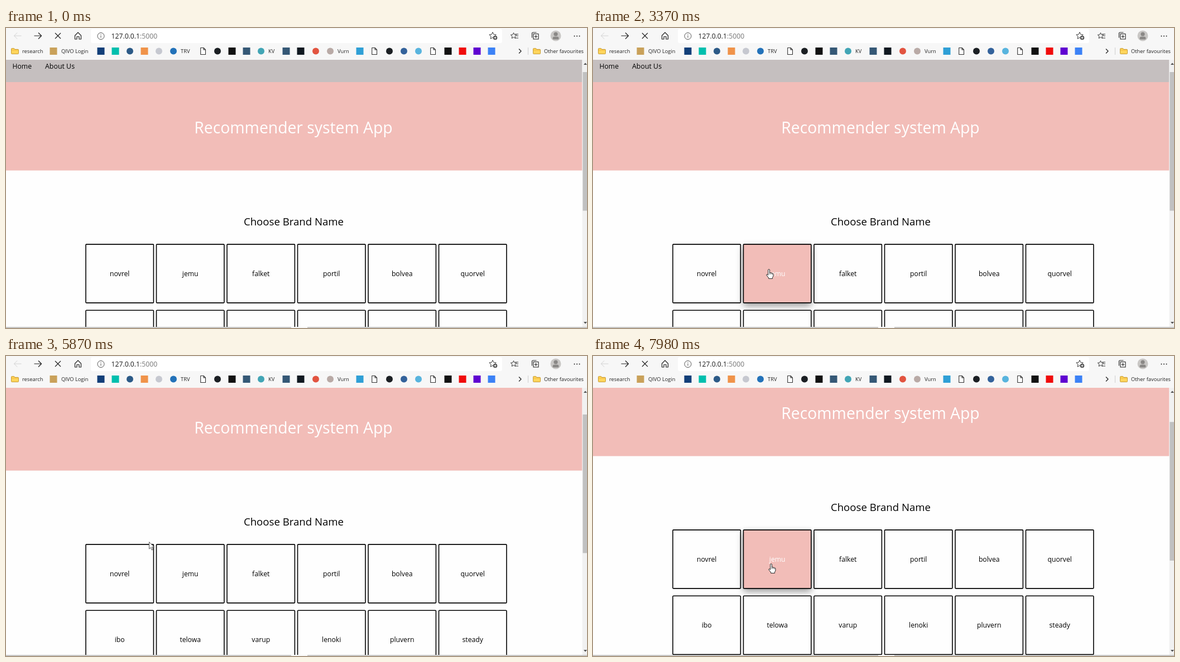
An HTML page with a canvas for the animation above (8 s loop, 1041x538 px).

```html
<!DOCTYPE html>
<html lang="en">
<head>
<meta charset="utf-8">
<title>Recommender system App</title>
<style>
  html, body { margin: 0; width: 100%; height: 100%; overflow: hidden; background: #fff; }
  canvas { display: block; }
</style>
</head>
<body>
<canvas id="stage" width="1041" height="538"></canvas>
<script>
const ctx = document.getElementById('stage').getContext('2d');
const LOOP = 8000;
const PINK = '#f2bdb8', INK = '#000', ICON = '#3b3b3b';
const FONT = '"Open Sans", "Noto Sans", sans-serif';

const VIEW = { top: 57, bottom: 536, right: 1032.6 };
const BOX = { x: 142.2, y: 387.1, w: 123, h: 106.6, dx: 126.5, dy: 118.4, line: 1.6 };
const BRANDS = [
  ['novrel', 'jemu', 'falket', 'portil', 'bolvea', 'quorvel'],
  ['ibo', 'telowa', 'varup', 'lenoki', 'pluvern', 'steady']
];

// Page offset: [time, pixels]
const SCROLL = [
  [0, 0],
  [5140, 3], [5230, 12], [5310, 22], [5380, 28], [5460, 31],
  [5710, 34], [5790, 42], [5870, 50], [5950, 56], [6020, 60], [6100, 62],
  [6510, 65], [6580, 72], [6650, 76]
];

// Pointer moves: [start, end, steps, from, to]
const MOVES = [
  [290, 520, 4, [994, 481], [969, 400]],
  [1210, 1360, 3, [915, 414], [800, 433]],
  [1670, 1900, 4, [776, 433], [506, 434]],
  [2360, 2670, 5, [499, 436], [413, 432]],
  [2970, 3370, 6, [402, 432], [315, 433]],
  [3670, 3840, 3, [285, 434], [230, 434]],
  [4220, 4380, 3, [236, 410], [256, 333]],
  [7670, 7980, 5, [258, 338], [319, 373]]
];

const HAND = new Path2D('M-1.2 1.2Q-1.2 -.3 .2 -.3Q1.6 -.3 1.6 1.2V6Q3.2 5 4 6.4Q5.6 5.6 6.3 7.1Q8 6.6 8 8.7V12L6.6 14.4V16.4H-.3V15L-4 10.5Q-4.5 8.6 -2.8 8.8L-1.2 10.2Z');
const ARROW = new Path2D('M.5 .5V13L3.3 10.4L5.2 15L7.2 14.1L5.3 9.7H9.3Z');
const SHEET = new Path2D('M-4.3 -6H1L4.5 -2.5V6H-4.3ZM1 -6V-2.5H4.5');
const FOLDER = new Path2D('M-6.5 -4Q-6.5 -5 -5.5 -5H-1.5L0 -3.2H5.5Q6.5 -3.2 6.5 -2.2V4Q6.5 5 5.5 5H-5.5Q-6.5 5 -6.5 4Z');

function text(str, x, y, size, color, align = 'left', weight = 400) {
  ctx.font = `${weight} ${size}px ${FONT}`;
  ctx.textAlign = align;
  ctx.fillStyle = color;
  ctx.fillText(str, x, y);
}

// Page copy is a little heavier than the browser's own labels.
function copy(str, x, y, size, color, align) {
  text(str, x, y, size, color, align, 500);
}

function rect(x, y, w, h, color) {
  ctx.fillStyle = color;
  ctx.fillRect(x, y, w, h);
}

function rounded(x, y, w, h, r, color) {
  ctx.beginPath();
  ctx.roundRect(x, y, w, h, r);
  ctx.fillStyle = color;
  ctx.fill();
}

function disc(x, y, r, color) {
  ctx.beginPath();
  ctx.arc(x, y, r, 0, 7);
  ctx.fillStyle = color;
  ctx.fill();
}

function ring(x, y, r, color, width = 1) {
  ctx.beginPath();
  ctx.arc(x, y, r, 0, 7);
  ctx.strokeStyle = color;
  ctx.lineWidth = width;
  ctx.stroke();
}

function shape(path, x, y, fill, stroke, width = 1) {
  ctx.save();
  ctx.translate(x, y);
  const p = typeof path === 'string' ? new Path2D(path) : path;
  if (fill) { ctx.fillStyle = fill; ctx.fill(p); }
  if (stroke) {
    ctx.strokeStyle = stroke;
    ctx.lineWidth = width;
    ctx.lineJoin = 'round';
    ctx.stroke(p);
  }
  ctx.restore();
}

function star(x, y, r) {
  ctx.beginPath();
  for (let i = 0; i < 10; i++) {
    const a = -Math.PI / 2 + i * Math.PI / 5, d = i % 2 ? r * 0.48 : r;
    ctx.lineTo(x + d * Math.cos(a), y + d * Math.sin(a));
  }
  ctx.closePath();
  ctx.strokeStyle = ICON;
  ctx.lineWidth = 1;
  ctx.stroke();
}

function lastBefore(list, t) {
  let found = null;
  for (const item of list) if (item[0] <= t) found = item;
  return found;
}

const scrollAt = t => lastBefore(SCROLL, t)[1];

// The hovered box is only re-evaluated when the pointer moves.
function pointerAt(t) {
  const move = lastBefore(MOVES, t);
  if (!move) return null;
  const [start, end, steps, from, to] = move;
  const last = steps - 1, gap = (end - start) / last;
  const i = Math.min(last, Math.floor((t - start) / gap + 1e-6));
  const [x, y] = from.map((v, k) => v + (to[k] - v) * i / last);
  return { x: Math.round(x), y: Math.round(y), hover: hit(x, y + scrollAt(start)) };
}

function hit(x, y) {
  const col = Math.floor((x - BOX.x) / BOX.dx), row = Math.floor((y - BOX.y) / BOX.dy);
  const inside = x - BOX.x - col * BOX.dx <= BOX.w && y - BOX.y - row * BOX.dy <= BOX.h;
  return inside && BRANDS[row] && BRANDS[row][col] || null;
}

function drawToolbar() {
  rect(0, 0, 1041, 57, '#f7f7f7');
  shape('M6.5 0H-6.5M-1 -5.5L-6.5 0L-1 5.5', 21, 14, null, '#d2d2d2');
  shape('M-6.5 0H6.5M1 -5.5L6.5 0L1 5.5', 57, 14, null, '#222', 1.2);
  shape('M-5 -5L5 5M5 -5L-5 5', 93, 14, null, '#222', 1.2);
  shape('M-5.5 -.5L0 -6L5.5 -.5V6H2V1.5H-2V6H-5.5Z', 129, 14, null, '#222', 1.2);

  rounded(152, 2, 737, 25, 3, '#fff');
  ring(170, 14.5, 6, '#555');
  rect(169.5, 13.5, 1, 4, '#555');
  rect(169.5, 11, 1, 1.3, '#555');
  const host = '127.0.0.1';
  text(host, 188.5, 19, 12.2, '#1b1b1b');
  text(':5000', 188.5 + ctx.measureText(host).width, 19, 12.2, '#767676');

  star(872, 14, 6.5);
  disc(876.5, 17.5, 3.8, '#555');
  shape('M-2 0H2M0 -2V2', 876.5, 17.5, null, '#fff');
  star(909.5, 14, 5.5);
  shape('M1 -3H7M3 0H7M1 4H7', 911, 14, null, ICON, 1.2);
  shape('M-5.5 3.5V-4.5Q-5.5 -6 -4 -6H2.5M-3 -3.5H6V6H-3ZM1.5 -1.5V4M-1.3 1.2H4.3', 948, 14, null, '#222', 1.1);
  disc(985, 14, 9.5, '#c9c7c5');
  disc(985, 11, 3.6, '#8a8886');
  rounded(979.5, 15.5, 11, 5, [5, 5, 3, 3], '#8a8886');
  for (const x of [1018.5, 1023, 1027.5]) disc(x, 14.5, 1, '#222');
}

function drawFolder(x) {
  shape(FOLDER, x, 41.5, '#ffd55c', '#b98a1c', 0.8);
  rect(x - 6, 39, 12, 1, '#f1b83a');
}

function drawBookmarks() {
  const squares = [
    [85, '#c9a15a'], [170, '#123f79'], [196, '#00bfae'], [248, '#f0934a'],
    [405, '#111'], [431, '#355876'], [502, '#355876'], [528, '#101820'],
    [634, '#2f9fd6'], [792, '#111'], [818, '#f00b0b'], [844, '#5f01d1'], [870, '#3c82f6']
  ];
  const circles = [
    [222, '#2c5a87'], [274, '#c6c8d0'], [300, '#2372b9'], [379, '#1b1f23'],
    [457, '#42a5b5'], [555, '#e25440'], [581, '#b9aaa6'], [687, '#1b1f23'],
    [713, '#33629b'], [739, '#58b4de']
  ];
  squares.forEach(([x, c]) => rect(x - 6.5, 35, 13, 13, c));
  circles.forEach(([x, c]) => disc(x, 41.5, 6, c));
  [353, 660, 765].forEach(x => shape(SHEET, x, 41.5, '#fff', '#333', 1.1));
  drawFolder(16);
  drawFolder(951);

  const labels = [
    ['research', 29], ['QIVO Login', 99], ['TRV', 313], ['KV', 470],
    ['Vurn', 594], ['Other favourites', 964]
  ];
  labels.forEach(([label, x]) => text(label, x, 45, 9.3, '#222'));
  shape('M-2 -4L2 0L-2 4', 921, 41.5, null, '#222', 1.2);
  rect(935, 35, 1, 13, '#d0d0d0');
}

function drawBox(name, x, y, hot) {
  const { w, h, line } = BOX;
  ctx.beginPath();
  ctx.roundRect(x + line / 2, y + line / 2, w - line, h - line, 1.2);
  if (hot) {
    ctx.save();
    ctx.shadowColor = 'rgba(0,0,0,.42)';
    ctx.shadowBlur = 13;
    ctx.shadowOffsetY = 5;
    ctx.fillStyle = PINK;
    ctx.fill();
    ctx.restore();
  }
  ctx.strokeStyle = INK;
  ctx.lineWidth = line;
  ctx.stroke();
  copy(name, x + w / 2, y + 57.6, 12.2, hot ? '#fff' : INK, 'center');
}

function drawPage(scroll, hover) {
  ctx.save();
  ctx.beginPath();
  ctx.rect(0, VIEW.top, VIEW.right, VIEW.bottom - VIEW.top);
  ctx.clip();
  rect(0, VIEW.top, VIEW.right, 479, '#fefefe');
  ctx.translate(0, -scroll);
  rect(0, 50, VIEW.right, 47, '#c5bfbf');
  copy('Home', 11.5, 73, 12.2, INK);
  copy('About Us', 70, 73, 12.4, INK);
  rect(0, 97, VIEW.right, 158.5, PINK);
  copy('Recommender system App', 515, 188.5, 28.3, '#fff', 'center');
  copy('Choose Brand Name', 515.5, 354, 18.6, INK, 'center');
  BRANDS.forEach((row, r) => row.forEach((name, c) =>
    drawBox(name, BOX.x + c * BOX.dx, BOX.y + r * BOX.dy, name === hover)));
  ctx.restore();
}

function drawFrame(scroll) {
  rect(VIEW.right, VIEW.top, 1041 - VIEW.right, 479, '#f1f1f1');
  rect(1033.4, 79 + scroll * 0.517, 7.6, 248.6, '#c1c1c1');
  shape('M-3 2L0 -1.5L3 2Z', 1038, 64, '#505050');
  shape('M-3 -2L0 1.5L3 -2Z', 1038, 529, '#505050');
  rect(0, VIEW.bottom, 1041, 2, '#c8c8c8');
  rect(511, VIEW.bottom, 29, 2, '#f6f6f6');
}

function drawPointer(p) {
  if (p.hover) {
    shape(HAND, p.x, p.y, '#fff', '#222');
    shape('M1.6 6V9M4 6.4V9M6.3 7.1V9.3', p.x, p.y, null, '#222', 0.7);
  } else {
    shape(ARROW, p.x, p.y, '#fff', '#444', 0.9);
  }
}

const begin = performance.now();
function draw() {
  const t = Math.max(0, performance.now() - begin) % LOOP;
  const scroll = scrollAt(t), pointer = pointerAt(t);
  rect(0, 0, 1041, 538, '#fff');
  drawPage(scroll, pointer && pointer.hover);
  drawToolbar();
  drawBookmarks();
  drawFrame(scroll);
  if (pointer) drawPointer(pointer);
  requestAnimationFrame(draw);
}
draw();
</script>
</body>
</html>
```
